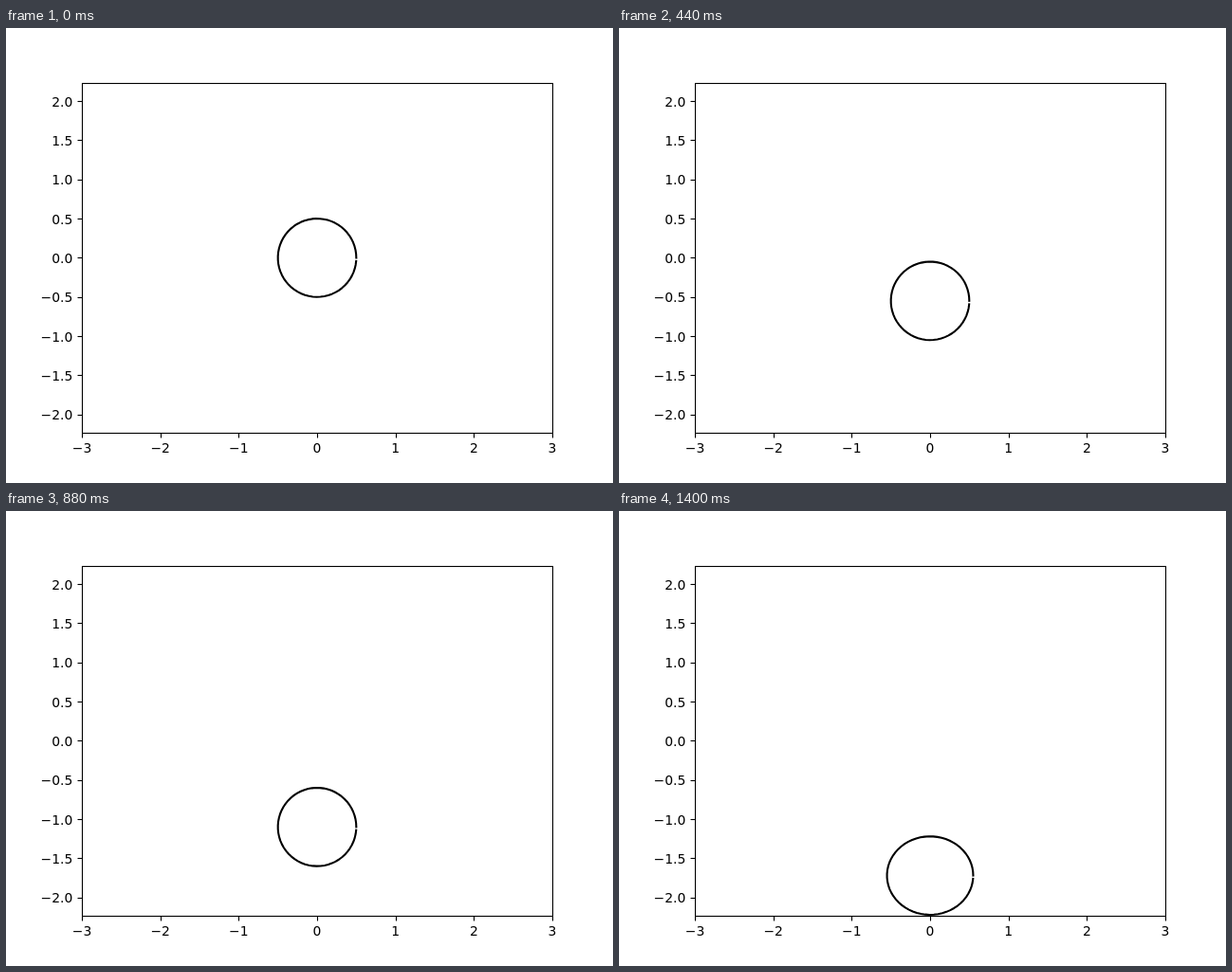
Recreate the animation shown at these times as an HTML page. Size 640 px wide and 480 px high, loop 4000 ms.

```html
<!DOCTYPE html>
<html lang="en">
<head>
<meta charset="utf-8">
<title>Falling ball</title>
<style>
  html, body { margin: 0; width: 100%; height: 100%; overflow: hidden; background: #fff; }
  svg { display: block; width: 640px; height: 480px; }
  text { font: 13.89px "DejaVu Sans", sans-serif; fill: #000; }
  .axis { fill: none; stroke: #000; stroke-width: 1.111; }
  #ball { fill: none; stroke: #000; stroke-width: 2.083; stroke-linecap: square; stroke-linejoin: round; }
</style>
</head>
<body>
<svg viewBox="0 0 640 480">
  <path id="ball"/>
  <g id="axes"></g>
</svg>
<script>
const LOOP = 4000, STEP = 40, LAST = 35;
const UNIT = 496 / 6, CX = 328, CY = 242.4;
const px = x => CX + x * UNIT;
const py = y => CY - y * UNIT;
const snap = v => Math.floor(v + 0.5) + 0.5;

const axes = document.getElementById('axes');
const ball = document.getElementById('ball');

function add(tag, attrs, content = '') {
  const el = document.createElementNS('http://www.w3.org/2000/svg', tag);
  for (const key in attrs) el.setAttribute(key, attrs[key]);
  el.textContent = content;
  axes.append(el);
}

const label = (v, digits) => v.toFixed(digits).replace('-', '\u2212');

function drawAxes() {
  add('rect', { class: 'axis', x: 80.5, y: 58.5, width: 496, height: 369 });
  for (let x = -3; x <= 3; x++) {
    add('path', { class: 'axis', d: `M${snap(px(x))} 427.5v5` });
    add('text', { x: px(x), y: 448, 'text-anchor': 'middle' }, label(x, 0));
  }
  for (let i = -4; i <= 4; i++) {
    const y = py(i / 2);
    add('path', { class: 'axis', d: `M75.5 ${snap(y)}h5` });
    add('text', { x: 70.28, y: Math.round(y + 5.5), 'text-anchor': 'end' }, label(i / 2, 1));
  }
}

// The outline stops just short of a full turn, leaving a small gap.
function outline(y, rx, ry) {
  const points = [];
  for (let i = 0; i < 63; i++) {
    const a = i * 0.1;
    points.push(px(rx * Math.cos(a)).toFixed(3) + ' ' + py(y + ry * Math.sin(a)).toFixed(3));
  }
  return 'M' + points.join('L');
}

// Steady fall, then a squashed rest on the floor.
function pose(n) {
  return n < LAST ? outline(-0.05 * n, 0.5, 0.5) : outline(-1.72, 0.55, 0.5);
}

let shown = -1;
function draw(ms) {
  const n = Math.min(LAST, Math.floor((ms % LOOP) / STEP));
  if (n !== shown) ball.setAttribute('d', pose(shown = n));
}

drawAxes();
draw(0);
const start = performance.now();
function tick() {
  draw(performance.now() - start);
  requestAnimationFrame(tick);
}
requestAnimationFrame(tick);
</script>
</body>
</html>
```
